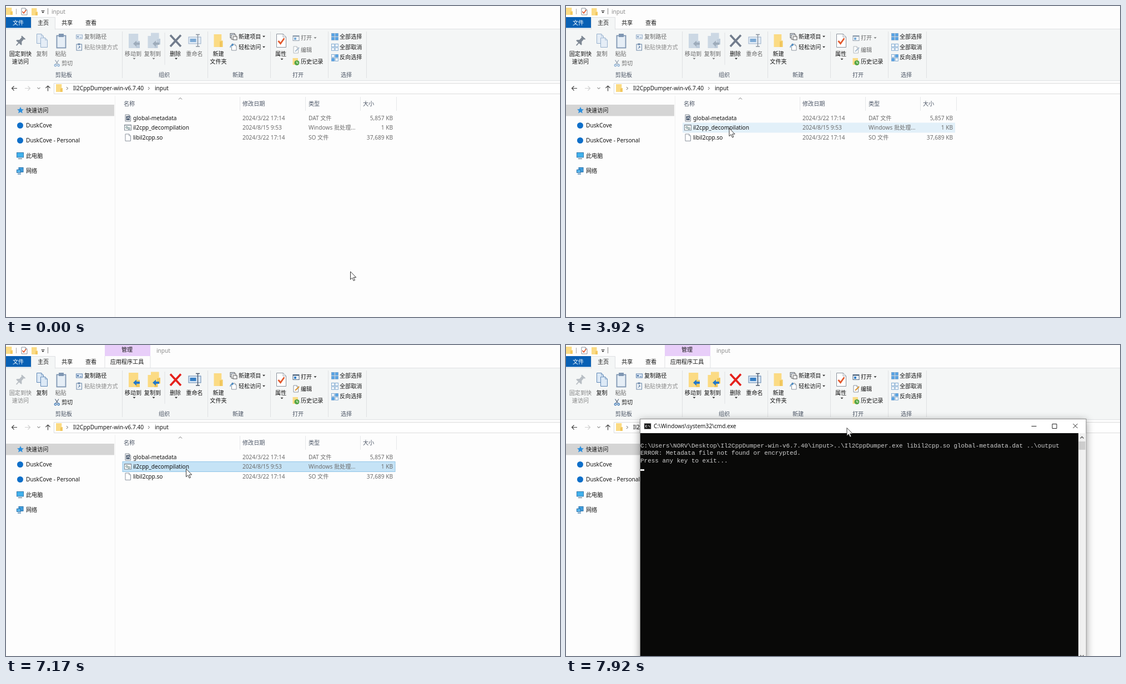
Write an HTML page that moves like this. It is 998 by 561 pixels and loops after 8000 ms.

```html
<!DOCTYPE html>
<html lang="zh-CN">
<head>
<meta charset="utf-8">
<style>
html, body { margin: 0; width: 998px; height: 561px; overflow: hidden; background: #fdfdfd; }
svg { display: block; }
text { font: 10.15px 'Noto Sans', 'Noto Sans CJK SC', sans-serif; fill: #141414; white-space: pre; }
.m { text-anchor: middle; }
.e { text-anchor: end; }
.g { fill: #6c6c6c; }
.h { fill: #4c5666; }
.w { fill: #fff; }
.l { fill: #8c8c8c; }
svg:not(.sel) .d { opacity: .62; }
svg:not(.sel) .d .leaf { fill: #b4c6da; }
svg:not(.sel) .d .flap { fill: #9db2ca; }
svg:not(.sel) .d .arrow { fill: #6b8098; }
svg:not(.sel) .on, .sel .off { display: none; }
.sel .pin { opacity: .5; }
#cmd { filter: drop-shadow(0 3px 7px #0006); }
#cmd .con { font: 10.94px 'Liberation Mono', monospace; fill: #cfcfcf; }
</style>
</head>
<body>
<svg id="stage" width="998" height="561" viewBox="0 0 998 561"></svg>
<script>
const text = (x, y, s, cls = '') => `<text x="${x}" y="${y + 3.6}" class="${cls}">${s}</text>`;
const rect = (x, y, w, h, fill, stroke = 'none', more = '') =>
  `<rect x="${x}" y="${y}" width="${w}" height="${h}" fill="${fill}" stroke="${stroke}" ${more}/>`;
const path = (d, stroke, width = 1, fill = 'none', cls = '') =>
  `<path d="${d}" stroke="${stroke}" stroke-width="${width}" fill="${fill}" class="${cls}"/>`;
const fill = (d, color, cls) => path(d, 'none', 0, color, cls);
const group = (cls, ...parts) => `<g class="${cls}">${parts.join('')}</g>`;
const vline = (x, y1, y2, color = '#dfe1e3') => path(`M${x} ${y1}V${y2}`, color);
const drop = (x, y, color = '#333') => fill(`M${x - 2.5} ${y - 1.2}h5l-2.5 2.8z`, color);

// Upright folder with a small flap at the lower right
const folder = (x, y, w, h) =>
  rect(x + w * .5, y + h * .5, w * .5, h * .5, '#f3c95f', 'none', 'class="flap"') +
  rect(x, y, w * .86, h, '#fbdb84', 'none', 'class="leaf"') +
  rect(x + w * .66, y + h * .55, w * .2, h * .45, '#f0c45a', 'none', 'class="flap"');
const sheet = (x, y, w, h, color = '#8b939d', paper = '#fff') =>
  path(`M${x} ${y}h${w * .68}l${w * .32} ${w * .32}V${y + h}h${-w}z`, color, 1, paper) +
  path(`M${x + w * .68} ${y}v${w * .32}h${w * .32}`, color, .8);
const tick = (x, y, k) => path(`M${x} ${y}l${3 * k} ${3.5 * k}l${5 * k} ${-7 * k}`, '#e2572b', 2 * k);
const pages = (x, y, w, h, dx, dy) =>
  [0, 1].map(i => sheet(x + i * dx, y + i * dy, w, h, '#6088b6', '#dce9f6')).join('');
const squares = (x, y, colors) =>
  colors.map((c, i) => rect(x + i % 2 * 6.6, y + (i >> 1) * 6.6, 5.2, 5.2, c, '#6a9cca', 'stroke-width=".8"')).join('');

const titleBar = [
  folder(0, 3, 12, 13), vline(18.5, 5, 15, '#aaa'),
  sheet(28, 4, 10, 12), tick(29.5, 10, .85),
  folder(46, 4, 11, 13), path('M63.5 8.5h6', '#333'), drop(66.5, 11.5), vline(75.5, 4, 15, '#888'),
  group('off', text(82, 10, 'input', 'l')),
  group('on', rect(178, 0, 82, 20, '#e8cef9'), vline(178, 20, 42), vline(260, 20, 42),
    text(218, 8.5, '管理', 'm'), text(218, 30, '应用程序工具', 'm'), text(271, 10, 'input', 'l')),
  rect(0, 20, 45, 19.5, '#0860b4'), text(22, 30, '文件', 'm w'),
];

const clipboardGroup = [
  group('pin',
    `<g transform="translate(26 63) rotate(42) scale(.88)">${fill('M-5 -10h10v2.5h-2v7l4 4v2h-14v-2l4-4v-7h-2zM-1 5.5h2v7h-2z', '#7e8894')}</g>`,
    text(26, 86, '固定到快', 'm'), text(26, 100.5, '速访问', 'm')),
  group('d', pages(55.5, 50.5, 12, 17, 7, 7), text(64.5, 86, '复制', 'm')),
  rect(91.5, 53.5, 16, 22, '#e6eef6', '#7f96b2', 'stroke-width="1.8"'), rect(95, 50, 9, 6, '#7f96b2'),
  text(98.5, 86, '粘贴', 'm g'),
  group('d', rect(126.5, 52, 11, 7, '#dce8f5', '#6286b0'), path('M128 54l1 3 1-3 1 3M133 57h3', '#355f93', .9), text(141, 55, '复制路径')),
  group('', rect(127, 69, 9.5, 11, '#f0f4f8', '#6d88a8'), rect(129.5, 67.5, 4, 3, '#6d88a8'),
    path('M130 77l3-4M131 73h2v2.5', '#4a6f9a'), text(141, 74, '粘贴快捷方式', 'l')),
  group('d', path('M88.5 97.5l5.5 8M95 97.5l-5.5 8', '#51647c', 1.2),
    '<g fill="none" stroke="#3b78b8" stroke-width="1.3"><circle cx="89" cy="107" r="1.8"/><circle cx="94.6" cy="107" r="1.8"/></g>',
    text(100, 103, '剪切')),
  text(104, 124, '剪贴板', 'm h'),
];

const blueArrow = (x, y) => fill(`M${x} ${y}l6-5.5v3.5h6v4h-6v3.5z`, '#2579c7', 'arrow');
const organizeGroup = [
  group('d', folder(221, 50, 20, 26), blueArrow(229, 68), text(229, 86, '移动到', 'm'), drop(231, 95)),
  group('d', folder(261, 48.5, 17, 21), folder(255.5, 54, 18, 22), blueArrow(264, 68), text(264, 86, '复制到', 'm'), drop(266, 95)),
  vline(286, 48, 106),
  group('off', path('M296 52.5l19 20.5M315 52.5l-19 20.5', '#717c8c', 3.7)),
  group('on', path('M296 52.5l19 20.5M315 52.5l-19 20.5', '#e5201b', 3.7)),
  text(305, 86, '删除', 'm'), drop(306.5, 95),
  group('d', rect(329, 56, 22, 12, '#dce9f6', '#6286b0'), rect(331.5, 59, 11, 6, '#387fc4'),
    path('M342 51.5h7M345.5 52v21M342 73h7', '#47566a', 1.4), text(339.5, 86, '重命名', 'm')),
  text(285, 124, '组织', 'm h'),
];

const newGroup = [
  folder(374.5, 51, 16, 23), text(382.5, 86, '新建', 'm'), text(382.5, 100.5, '文件夹', 'm'),
  rect(404, 49.5, 8, 8, '#dceafa', '#666'), rect(406, 52, 8, 8, '#fff', '#666'), rect(409, 55, 7, 6, '#f8f8f8', '#555'),
  text(419, 55, '新建项目'), drop(464.5, 55),
  sheet(406.5, 69, 8.5, 11), path('M404 75q0-5 5-5M407.5 68l2 2-2 2', '#2f7cc0', 1.2),
  text(419, 74, '轻松访问'), drop(464.5, 74),
  text(418, 124, '新建', 'm h'),
];

const openGroup = [
  sheet(487.5, 50.5, 17, 24), tick(490.5, 63, 1.35), text(495, 86.5, '属性', 'm'), drop(497, 96),
  group('d', rect(517, 53.5, 11, 9, '#fff', '#51677f'), rect(517, 53.5, 11, 2, '#51677f'), rect(519, 57, 4, 4, '#2f80ca'),
    text(531, 57.5, '打开'), drop(557, 57.5)),
  group('d', sheet(518, 73, 8.5, 12), group('on', path('M521 82l7-7', '#d89030', 2)), group('off', path('M521 82l7-7', '#7f9ab8', 2)),
    text(531, 79, '编辑')),
  folder(516.5, 94, 11, 12), '<circle cx="524" cy="102.5" r="4.5" fill="#55a647"/>', path('M524 100v3h2.5', '#fff'),
  text(531, 100, '历史记录'),
  text(526, 124, '打开', 'm h'),
];

const blue = '#57a4e6', pale = '#f5f8fb';
const selectGroup = [
  squares(586.5, 49.5, [blue, blue, blue, blue]), text(601, 55, '全部选择'),
  squares(586.5, 68.5, [pale, pale, pale, pale]), text(601, 74, '全部取消'),
  squares(586.5, 87.5, [pale, blue, blue, pale]), text(601, 92.5, '反向选择'),
  text(613, 124, '选择', 'm h'),
];

const ribbon = [
  rect(0, 42, 998, 92, '#f4f6f6'), path('M0 41.5H998M0 134.5H998', '#dfe1e3'),
  path('M45.5 42.5V20.5H88.5V42.5', '#dfe1e3', 1, '#f4f6f6'),
  text(67, 30, '主页', 'm'), text(110, 30, '共享', 'm'), text(153, 30, '查看', 'm'),
  [209, 363, 476, 580, 649].map(x => vline(x + .5, 46, 130)).join(''),
  ...clipboardGroup, ...organizeGroup, ...newGroup, ...openGroup, ...selectGroup,
];

const addressBar = [
  path('M998 139.5H86.5V158.5H998', '#dcdcdc', 1, '#fff'),
  path('M20 148.5H10.5M14.5 144.5l-4 4 4 4', '#444', 1.2),
  path('M34 148.5H43.5M39.5 144.5l4 4-4 4', '#d0d0d0', 1.2),
  path('M56.5 147l2.5 2.5 2.5-2.5', '#555'),
  path('M75.5 153.5V144M71.5 148l4-4 4 4', '#444', 1.2),
  folder(90, 141, 12, 14),
  path('M109 146l2.5 2.5-2.5 2.5M256 146l2.5 2.5-2.5 2.5', '#555'),
  text(121, 148, 'Il2CppDumper-win-v6.7.40'), text(268, 148, 'input'),
];

const dot = y => `<circle cx="25.5" cy="${y}" r="5.5" fill="#0f6fc9"/>`;
const sidebar = [
  rect(0, 178, 195, 20.5, '#d5d5d5'), vline(196.5, 162, 561, '#f0f0f0'),
  fill('M26 182l1.8 4 4.2.4-3.2 2.8 1 4.3-3.8-2.3-4 2.3 1.2-4.3-3.2-2.8 4.2-.4z', '#2d8fdd'),
  text(36, 188, '快速访问'),
  dot(215.5), text(36, 215.5, 'DuskCove'),
  dot(242.5), text(36, 242.5, 'DuskCove - Personal'),
  rect(19.5, 264.5, 12, 8.5, '#41b1ec', '#3579ad'), path('M22 275.5h7', '#5f7d92', 1.3), text(36, 270, '此电脑'),
  rect(23, 291.5, 8, 8, '#3f9fe0', '#286fa8'), rect(19.5, 295.5, 7, 5, '#5bb8ef', '#286fa8'), path('M21 303h6', '#286fa8', 1.3),
  text(36, 297, '网络'),
];

const gear = (x, y, r, c) => `<circle cx="${x}" cy="${y}" r="${r}" fill="none" stroke="${c}" stroke-width="1.3"/>`;
const files = [
  [202, 'global-metadata', '2024/3/22 17:14', 'DAT 文件', '5,857 KB'],
  [219.5, 'il2cpp_decompilation', '2024/8/15 9:53', 'Windows 批处理...', '1 KB'],
  [237.5, 'libil2cpp.so', '2024/3/22 17:14', 'SO 文件', '37,689 KB'],
];
const fileList = [
  path('M311 168.5l3-3 3 3', '#777'),
  [421, 539, 638, 703].map(x => vline(x + .5, 164, 189, '#e5e7e9')).join(''),
  text(212, 176, '名称', 'h'), text(426, 176, '修改日期', 'h'), text(545, 176, '类型', 'h'), text(643, 176, '大小', 'h'),
  rect(210, 0, 491, 18, '#e2f0f9', 'none', 'id="row"'),
  sheet(215, 196, 9.5, 12, '#7b838d'), rect(216.5, 198.5, 6.5, 7.5, '#4f5f74'), path('M218 204l2-4 2 4', '#fff', .9),
  rect(213.5, 214.5, 12, 9.5, '#fff', '#7d8790'), path('M214 215h11', '#7d8790'), gear(217.5, 219, 1.6, '#7f9a9a'), gear(221.5, 221, 1.6, '#7f9a9a'),
  sheet(215, 231, 9.5, 12.5),
  ...files.map(([y, name, date, type, size]) =>
    text(229, y, name) + text(426, y, date, 'g') + text(545, y, type, 'g') + text(697, y, size, 'e g')),
];

const consoleWindow = `<g id="cmd">${[
  rect(133.5, 133.5, 803.5, 446, '#fff', '#8a8a8a'),
  rect(134, 159, 789, 420, '#090908'),
  rect(141, 141.5, 12, 10, '#111', '#888', 'stroke-width=".7"'), path('M146 145h-2.5v3h2.5M147.5 145v.6M147.5 147.5v.6M149 144.5l2 4', '#fff', .9),
  text(158, 146, 'C:\\Windows\\system32\\cmd.exe'),
  path('M838.5 146.5h9M876 142.5h8v8h-8zM913.5 142l8 8M921.5 142l-8 8', '#222'),
  rect(923, 159, 13.5, 420, '#f0f0f0'), rect(923.5, 174, 12, 15, '#cdcdcd'),
  path('M926.5 168.5l3-3 3 3M926.5 559.5l3 3 3-3', '#555', 1.3),
  text(134, 181, 'C:\\Users\\NORV\\Desktop\\Il2CppDumper-win-v6.7.40\\input&gt;..\\Il2CppDumper.exe libil2cpp.so global-metadata.dat ..\\output', 'con'),
  `<g id="result">${text(134, 194.7, 'ERROR: Metadata file not found or encrypted.', 'con')}${text(134, 208.5, 'Press any key to exit...', 'con')}</g>`,
  rect(134, 0, 7, 3, '#f0f0f0', 'none', 'id="caret"'),
].join('')}</g>`;

const pointer = `<path id="pointer" d="M0 0V14.3L3.3 11.3 5.7 16.6 7.9 15.6 5.6 10.5H10.2Z" fill="#fff" stroke="#222" stroke-width=".9"/>`;

const stage = document.getElementById('stage');
stage.innerHTML = [rect(0, 0, 998, 561, '#fdfdfd'), ...ribbon, ...titleBar, ...addressBar, ...sidebar, ...fileList, consoleWindow, pointer].join('');
const [row, cmd, result, caret, arrow] = ['row', 'cmd', 'result', 'caret', 'pointer'].map(id => document.getElementById(id));

// Pointer path: step, x, y (12 steps per second)
const route = [
  [0, 620.5, 479], [10, 618, 486], [18, 246, 274], [19, 238, 264.5], [20, 240, 241], [30, 262, 217],
  [35, 270, 214], [38, 273, 196], [42, 273, 196], [44, 284, 196], [46, 284, 196], [47, 294, 220.5],
  [50, 264, 241], [54, 264, 241], [62, 324.5, 223.5], [89, 324.5, 223.5], [94, 474, 163], [95, 506, 149.5],
];
const along = step => {
  const i = Math.max(1, route.findIndex(k => k[0] >= step));
  const [a, b] = [route[i - 1], route[i]];
  const u = (step - a[0]) / (b[0] - a[0]);
  return [a[1] + (b[1] - a[1]) * u, a[2] + (b[2] - a[2]) * u];
};
// Console opening: [opacity, scale] from step 87 on
const opening = [[.18, .965], [.54, .9776], [.85, .992], [1, 1]];

function draw(now) {
  const step = Math.min(95, Math.floor(now % 8000 * .012 + .06));
  const [x, y] = along(step);
  arrow.setAttribute('transform', `translate(${x} ${y})`);

  const picked = step >= 79;
  const hover = Math.floor((y - 193) / 18);
  stage.classList.toggle('sel', step >= 80);
  row.style.display = picked || (hover >= 0 && hover < 3 && x < 701) ? '' : 'none';
  row.setAttribute('y', 192.5 + 18 * (picked ? 1 : hover));
  row.setAttribute('fill', picked ? '#c5e3f6' : '#e2f0f9');
  row.setAttribute('stroke', picked ? '#91c5e8' : 'none');

  cmd.style.display = step < 87 ? 'none' : '';
  const [alpha, scale] = opening[Math.max(0, Math.min(3, step - 87))];
  cmd.style.opacity = alpha;
  cmd.setAttribute('transform', `translate(535 356) scale(${scale}) translate(-535 -356)`);
  const done = step >= 90;
  result.style.display = done ? '' : 'none';
  caret.setAttribute('y', done ? 224 : 197);
}

const start = performance.now();
(function loop() {
  draw(performance.now() - start);
  requestAnimationFrame(loop);
})();
</script>
</body>
</html>
```
